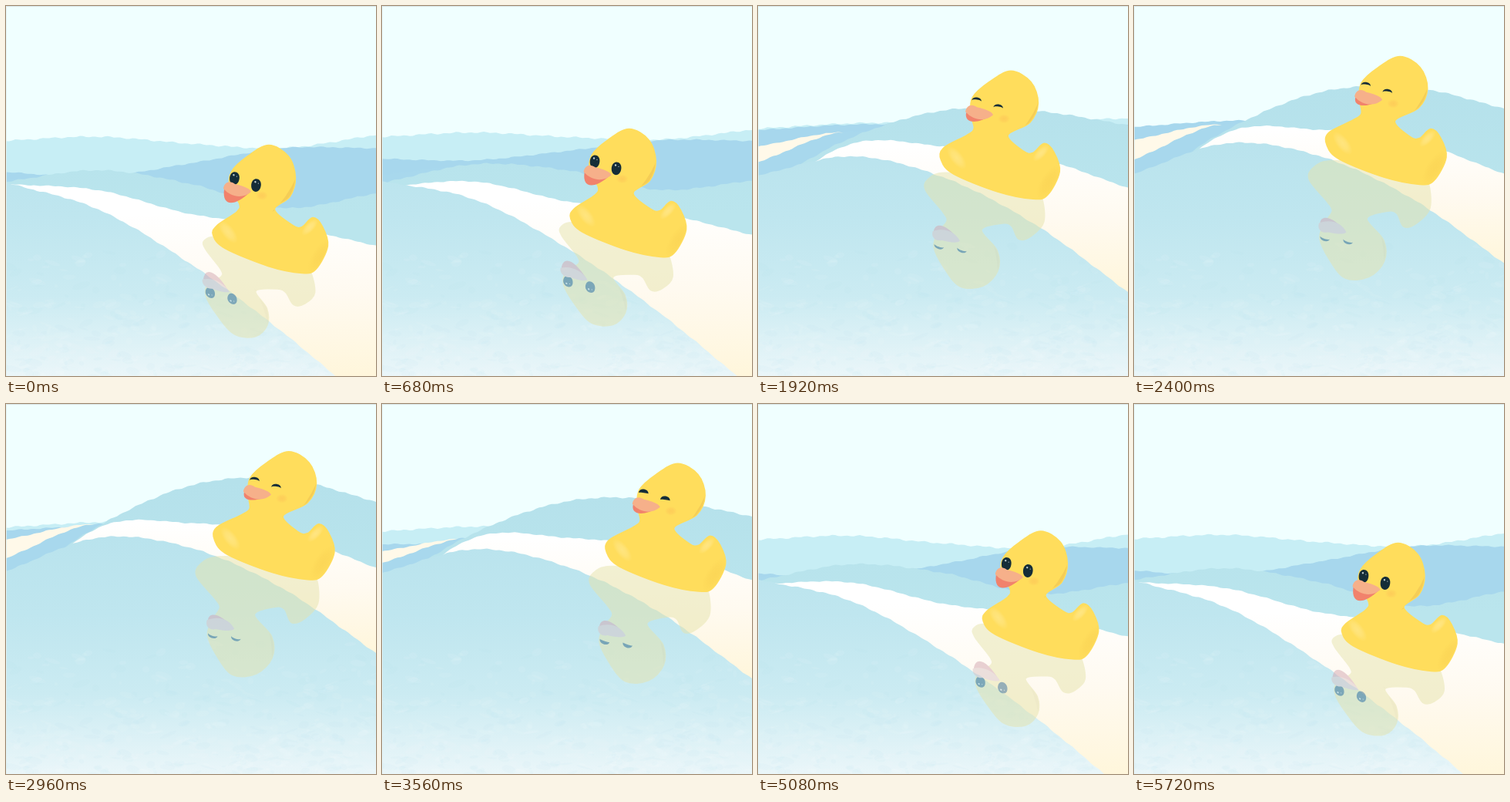
These frames come from a looping animation (480 px wide and 480 px high, 5.76 s). An HTML page with a canvas:

```html
<!DOCTYPE html>
<html lang="en">
<head>
<meta charset="utf-8">
<title>Duck on the swell</title>
<style>
html, body { margin: 0; width: 100%; height: 100%; overflow: hidden; background: #f0ffff; }
canvas { display: block; width: 480px; height: 480px; }
</style>
</head>
<body>
<canvas id="stage" width="480" height="480"></canvas>
<script>
const SIZE = 480, LOOP = 5760, STEP = 40, GAP = 120;
const ctx = document.getElementById('stage').getContext('2d');

function layer() {
  const c = document.createElement('canvas');
  c.width = c.height = SIZE;
  return c.getContext('2d');
}
const mirror = layer();

const clamp = (v, a = 0, b = 1) => Math.max(a, Math.min(b, v));
const ease = (a, b, t) => { const u = clamp((t - a) / (b - a)); return u * u * (3 - 2 * u); };
const mix = (a, b, u) => a + (b - a) * u;

// 1 when the swell is lowest, 0 on its crest; it falls a little slower than it rises.
function swell(a) {
  const s = Math.sin(a);
  return 0.5 + 0.5 * Math.cos(a) - 0.035 * s + 0.03 * s * s;
}

// Each ridge sways between two outlines, with key heights every GAP px.
const LAND = {
  far: { low: [176, 171, 181, 187, 169], high: [158, 151, 149, 147, 144], lead: 0.5 },
  blue: { low: [220, 227, 208, 187, 187], high: [157, 149, 150, 150, 152], lead: 0.5 },
  strip: { low: [238, 232, 262], high: [173, 153, 185], lead: 0.25 },
  trough: { low: [225, 228, 262], high: [199, 152, 185], lead: 0.25 },
  hill: { low: [228, 213, 231, 262, 243], high: [240, 158, 105, 96, 126], lead: 0 },
  shore: { low: [231, 239, 270, 285, 311], high: [260, 160, 154, 168, 212], lead: 0 },
  front: { low: [229, 264, 335, 424, 525], high: [217, 173, 186, 239, 322], lead: 0 }
};

const heights = ({ low, high, lead }, a) => low.map((y, i) => mix(high[i], y, swell(a + lead)));

function ridge(h, x) {
  const i = Math.min(h.length - 2, Math.floor(x / GAP)), u = x / GAP - i;
  const p1 = h[i], p2 = h[i + 1];
  const p0 = i ? h[i - 1] : 2 * p1 - p2;
  const p3 = i + 2 < h.length ? h[i + 2] : 2 * p2 - p1;
  return p1 + u / 2 * (p2 - p0 + u * (2 * p0 - 5 * p1 + 4 * p2 - p3 + u * (3 * (p1 - p2) + p3 - p0)));
}

function land(h, fill, rough = 0.5) {
  const end = (h.length - 1) * GAP;
  ctx.beginPath();
  ctx.moveTo(0, SIZE);
  for (let x = 0; x <= end; x += 4) {
    const wob = Math.sin(x * 0.37 + rough * 9) + Math.sin(x * 0.16 + 2) * 0.8;
    ctx.lineTo(x, ridge(h, x) + wob * rough);
  }
  ctx.lineTo(end, SIZE);
  ctx.closePath();
  ctx.fillStyle = fill;
  ctx.fill();
}

function shade(y0, y1, ...colors) {
  const g = ctx.createLinearGradient(0, y0, 0, y1);
  colors.forEach((c, i) => g.addColorStop(i / (colors.length - 1), c));
  return g;
}

// Pale brush marks that lie still on the near water.
const paint = layer();
(function () {
  let seed = 7;
  const rnd = () => (seed = seed * 16807 % 2147483647) / 2147483647;
  for (let i = 0; i < 500; i++) {
    const x = rnd() * SIZE, y = 300 + Math.sqrt(rnd()) * 185;
    paint.fillStyle = rnd() < 0.65 ? 'rgba(255,255,255,.07)' : 'rgba(165,216,230,.06)';
    paint.beginPath();
    paint.ellipse(x, y, 2 + rnd() * 10, 1 + rnd() * 4, rnd() - 0.5, 0, 7);
    paint.fill();
  }
})();

const OUTLINE = [
  [269, 297], [274, 285], [300, 267], [303, 256], [291, 237], [293, 215], [314, 195],
  [341, 181], [366, 195], [375, 222], [368, 247], [348, 264], [372, 285], [384, 287],
  [398, 275], [410, 286], [417, 311], [402, 341], [384, 346], [340, 337], [284, 314]];

// Leaning pushes the head to the right, widens the body and puffs up the breast.
function bend([x, y], lean) {
  const puff = Math.exp(-(((x - 283) ** 2 + (y - 275) ** 2) / 400));
  return [
    x + lean * (0.0016 * (x - 269) + 0.88 * clamp((272 - y) / 32) - 0.25 * puff),
    y - lean * 0.4 * puff
  ];
}

function smooth(g, pts) {
  const n = pts.length, p = i => pts[(i + n) % n];
  g.beginPath();
  g.moveTo(...p(0));
  for (let i = 0; i < n; i++) {
    const a = p(i - 1), b = p(i), c = p(i + 1), d = p(i + 2);
    g.bezierCurveTo(b[0] + (c[0] - a[0]) / 6, b[1] + (c[1] - a[1]) / 6,
      c[0] - (d[0] - b[0]) / 6, c[1] - (d[1] - b[1]) / 6, c[0], c[1]);
  }
  g.closePath();
}

function glow(g, x, y, rx, ry, turn, rgb, a) {
  g.save();
  g.translate(x, y);
  g.rotate(turn);
  g.scale(rx, ry);
  const r = g.createRadialGradient(0, 0, 0, 0, 0, 1);
  r.addColorStop(0, `rgba(${rgb},${a})`);
  r.addColorStop(0.5, `rgba(${rgb},${a * 0.7})`);
  r.addColorStop(1, `rgba(${rgb},0)`);
  g.fillStyle = r;
  g.fillRect(-1, -1, 2, 2);
  g.restore();
}

const REAL = { body: '#ffdd5c', dark: '#eec453', eye: '#152d38', bill: '#f6b08a', lip: '#f1826c', gloss: 1 };
const REFLECTED = { body: '#e6e4ac', dark: '#dcd8a2', eye: '#2f6580', bill: '#d8c4c6', lip: '#d3a6b0', gloss: 0 };

function eye(g, x, y, open, c) {
  const top = mix(-6.5, -10.5, open), low = mix(-2.5, 12, open);
  g.save();
  g.translate(x, y);
  g.rotate(0.12);
  g.fillStyle = c.eye;
  g.beginPath();
  g.moveTo(-6.3, 0);
  g.bezierCurveTo(-6.3, top, 6.3, top, 6.3, 0);
  g.bezierCurveTo(6.3, low, -6.3, low, -6.3, 0);
  g.fill();
  if (open > 0.6) {
    g.fillStyle = 'rgba(235,248,250,.8)';
    g.beginPath();
    g.arc(-1.5, -3.6, 1.2, 0, 7);
    g.arc(2.6, -2.2, 0.6, 0, 7);
    g.fill();
  }
  g.restore();
}

function duck(g, { lean, open, gape }, c) {
  smooth(g, OUTLINE.map(p => bend(p, lean)));
  g.fillStyle = g.strokeStyle = c.body;
  g.lineWidth = 2.4;
  g.fill();
  g.stroke();
  g.save();
  g.clip();
  glow(g, 288, 293, 18, 8, 0.9, '255,238,170', 0.45 * c.gloss);
  glow(g, 394 + lean * 0.2, 287, 14, 6, -0.8, '255,238,170', 0.5 * c.gloss);
  glow(g, 408, 325, 26, 11, -1, '244,200,75', 0.3 * c.gloss);
  g.translate(lean, 0);
  g.fillStyle = c.dark;
  g.globalAlpha = 0.6;
  g.beginPath();
  g.moveTo(377, 221);
  g.quadraticCurveTo(380, 252, 345, 267);
  g.quadraticCurveTo(364, 250, 377, 221);
  g.fill();
  g.restore();

  g.save();
  g.translate(lean, -lean * 0.2);
  glow(g, 332, 246, 8, 6, 0, '250,165,80', 0.28 * c.gloss);
  eye(g, 296.5, 223, open, c);
  eye(g, 324.5, 232, open, c);
  g.fillStyle = c.lip;
  g.beginPath();
  g.moveTo(283, 238);
  g.bezierCurveTo(280, 249 + 11 * gape, 296, 252 + 9 * gape, 317, 241);
  g.closePath();
  g.fill();
  g.fillStyle = c.bill;
  g.beginPath();
  g.moveTo(282, 237);
  g.bezierCurveTo(283, 228, 291, 226, 297, 231);
  g.bezierCurveTo(306, 233, 316, 236, 318, 241);
  g.bezierCurveTo(308, 250, 293, 249, 282, 237);
  g.fill();
  g.restore();
}

function water(a) {
  const shore = heights(LAND.shore, a), front = heights(LAND.front, a);
  land(shore, shade(shore[2], Math.min(SIZE, front[4]), '#ffffff', '#fffaf0', '#fff6db'), 0.4);
  land(front, shade(170, SIZE, '#b9e3ed', '#bfe6ef', '#cbebf2', '#eaf6f9'));
  ctx.save();
  ctx.beginPath();
  ctx.moveTo(0, SIZE);
  for (let x = 0; x <= SIZE; x += 8) ctx.lineTo(x, ridge(front, x) + 2);
  ctx.lineTo(SIZE, SIZE);
  ctx.clip();
  ctx.drawImage(paint.canvas, 0, 0);
  ctx.restore();
}

function reflection(dx, dy, pose, low) {
  // The mirror image pivots on the right eye and slants with the waterline.
  const ex = 324 + pose.lean, ey = 232 - pose.lean * 0.2;
  mirror.setTransform(1, 0, 0, 1, 0, 0);
  mirror.clearRect(0, 0, SIZE, SIZE);
  mirror.setTransform(0.94, mix(0.42, 0.52, low), mix(0.42, 0.25, low), mix(-0.9, -0.72, low),
    ex + dx + mix(-52, -31, low), ey + dy + mix(194, 148, low));
  mirror.translate(-ex, -ey);
  duck(mirror, pose, REFLECTED);
  ctx.globalAlpha = 0.5;
  ctx.drawImage(mirror.canvas, 0, 0);
  ctx.globalAlpha = 1;
}

function draw(t) {
  const a = t / LOOP * Math.PI * 2, low = swell(a);
  const dx = -35 * Math.sin(a);
  const dy = -59.5 * (1 - Math.cos(a)) - 8 * Math.max(0, Math.sin(a));
  const pose = {
    lean: 23 * (1 - low),
    gape: low,
    open: 1 - ease(1280, 1480, t) + ease(3520, 3720, t)
  };

  ctx.fillStyle = '#f0ffff';
  ctx.fillRect(0, 0, SIZE, SIZE);
  land(heights(LAND.far, a), '#c7eef5', 0.7);
  land(heights(LAND.blue, a), '#a7d7ed');
  land(heights(LAND.strip, a), '#fff9e9', 0.4);
  land(heights(LAND.trough, a), '#a8d8ed');
  land(heights(LAND.hill, a), shade(100, 270, '#b5e1eb', '#bae5ed'), 0.6);
  water(a);
  reflection(dx, dy, pose, low);

  ctx.save();
  ctx.translate(dx, dy);
  duck(ctx, pose, REAL);
  ctx.restore();

  ctx.fillStyle = '#d9e5e6';
  ctx.fillRect(0, 0, SIZE, 1);
  ctx.fillStyle = 'rgba(226,240,242,.8)';
  ctx.fillRect(0, 0, 1, SIZE);
}

function frame() {
  draw(Math.floor(performance.now() % LOOP / STEP) * STEP);
  requestAnimationFrame(frame);
}
frame();
</script>
</body>
</html>
```
